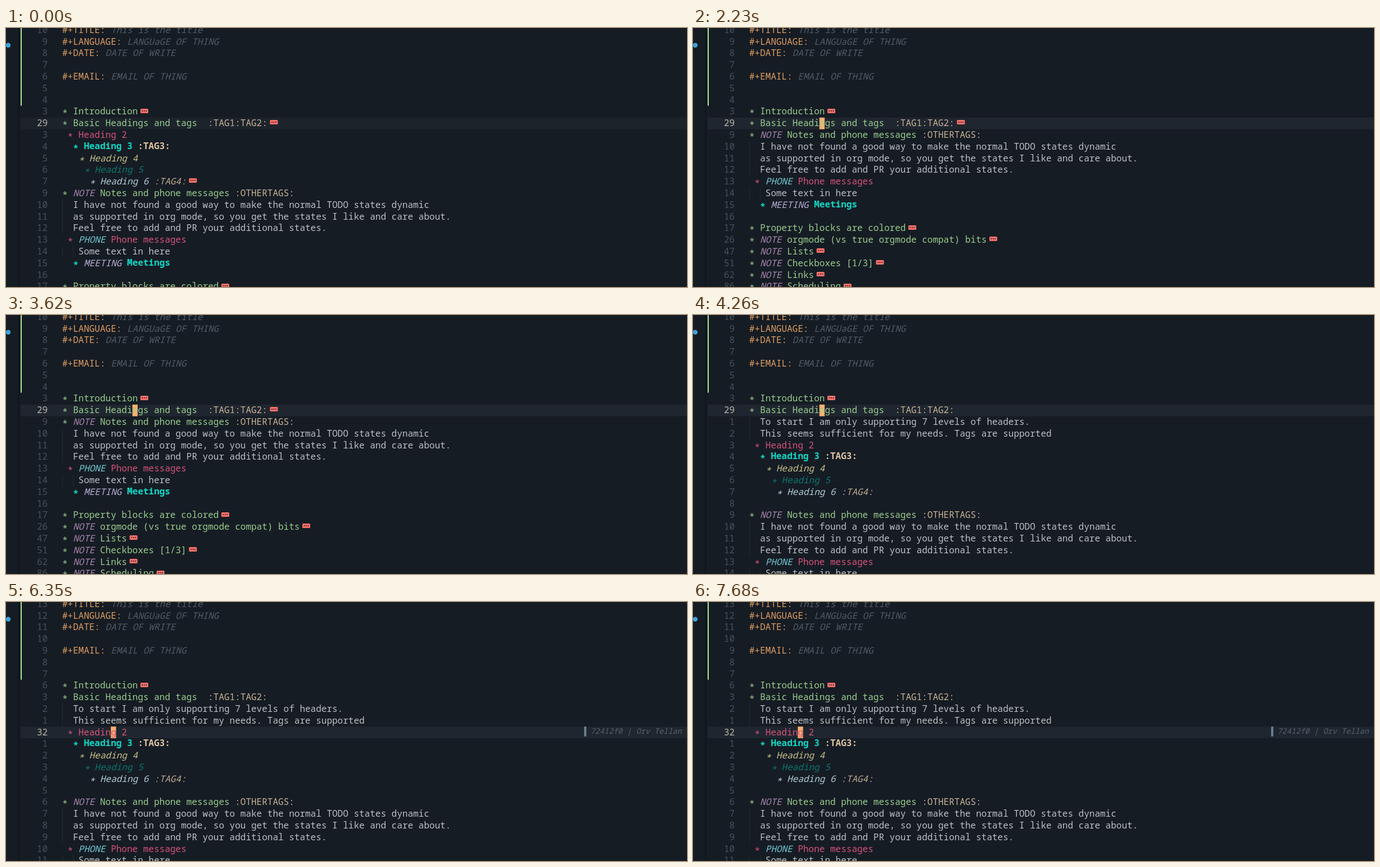
Animation of 1211 by 462 pixels, one loop 8 s. Source, as an HTML page with a canvas:

```html
<!DOCTYPE html>
<html lang="en">
<head>
<meta charset="utf-8">
<title>Org folding</title>
<style>
  html, body { margin: 0; width: 100%; height: 100%; overflow: hidden; background: #161c24; }
  canvas { display: block; }
</style>
</head>
<body>
<canvas id="stage" width="1211" height="462"></canvas>
<script>
const ctx = document.getElementById('stage').getContext('2d');
const WIDTH = 1211, HEIGHT = 462, LOOP = 8000;
const CELL = 9.6, ROW = 20.8, LEFT = 100, FIRST = 3.8;
const BASELINE = 5, BOLD_BASELINE = 4;
const FAMILY = '"Noto Sans Mono", "Liberation Mono", monospace';

// style: [colour, font variant]
const STYLES = {
  key: ['#dc9c61'], meta: ['#505b65', 'italic'], text: ['#bcc0c3'],
  h1: ['#98cd8e'], h2: ['#d6527a'], h3: ['#10dac8', 'bold'], h4: ['#c6c38a', 'italic'],
  h5: ['#0b766f', 'italic'], h6: ['#b2ced6', 'italic'],
  tag: ['#c6b196'], tagBold: ['#dfc5a4', 'bold'], tagItalic: ['#bda992', 'italic'],
  note: ['#a886ae', 'italic'], phone: ['#72cbd3', 'italic'], meeting: ['#b6add4', 'italic']
};

const option = (key, value) => [['key', key + ' '], ['meta', value]];
const note = title => [['h1', '* '], ['note', 'NOTE '], ['h1', title]];

// Visible text by absolute line number; each line is a list of [style, text]
const LINES = {
  19: option('#+TITLE:', 'This is the title'),
  20: option('#+LANGUAGE:', 'LANGUaGE OF THING'),
  21: option('#+DATE:', 'DATE OF WRITE'),
  22: [],
  23: option('#+EMAIL:', 'EMAIL OF THING'),
  24: [],
  25: [],
  26: [['h1', '* Introduction']],
  29: [['h1', '* Basic Headings and tags  '], ['tag', ':TAG1:TAG2:']],
  30: [['text', '  To start I am only supporting 7 levels of headers.']],
  31: [['text', '  This seems sufficient for my needs. Tags are supported']],
  32: [['h2', ' * Heading 2']],
  33: [['h3', '  * Heading 3 '], ['tagBold', ':TAG3:']],
  34: [['h4', '   * Heading 4']],
  35: [['h5', '    * Heading 5']],
  36: [['h6', '     * Heading 6 '], ['tagItalic', ':TAG4:']],
  37: [],
  38: [...note('Notes and phone messages '), ['tag', ':OTHERTAGS:']],
  39: [['text', '  I have not found a good way to make the normal TODO states dynamic']],
  40: [['text', '  as supported in org mode, so you get the states I like and care about.']],
  41: [['text', '  Feel free to add and PR your additional states.']],
  42: [['h2', ' * '], ['phone', 'PHONE '], ['h2', 'Phone messages']],
  43: [['text', '   Some text in here']],
  44: [['h3', '  * '], ['meeting', 'MEETING '], ['h3', 'Meetings']],
  45: [],
  46: [['h1', '* Property blocks are colored']],
  55: note('orgmode (vs true orgmode compat) bits'),
  76: note('Lists'),
  80: note('Checkboxes [1/3]'),
  91: note('Links'),
  115: note('Scheduling')
};
const ALWAYS_FOLDED = [26, 46, 55, 76, 80, 91, 115];

const span = (a, b) => Array.from({ length: b - a + 1 }, (_, i) => a + i);
const FOLDS = {
  outline: { hidden: [30, 31, 37], marks: [29, 36] },
  closed: { hidden: span(30, 37), marks: [29] },
  heading2: { hidden: span(33, 37), marks: [32] },
  heading3: { hidden: span(34, 37), marks: [33] },
  open: { hidden: [], marks: [] }
};

const FOLD_TIMES = [
  [0, 'outline'], [2230, 'closed'], [2640, 'heading2'], [2930, 'open'],
  [3620, 'closed'], [3940, 'heading2'], [4260, 'open'],
  [5650, 'heading2'], [6040, 'heading3'], [6350, 'open'],
  [7050, 'heading2'], [7360, 'heading3'], [7680, 'open']
];
// Pointer positions; a bare time hides the pointer
const POINTER = [
  [0], [70, 711, 341], [150, 638, 346], [380, 468, 273], [460, 318, 212],
  [610, 286, 195], [690, 252, 178], [760, 240, 171], [1000, 236, 171], [1080, 233, 171],
  [2230], [4800, 232, 172], [4880, 229, 177], [4960, 222, 188], [5040, 212, 203],
  [5120, 202, 217], [5200, 193, 229], [5280, 187, 236], [5360, 184, 238],
  [6040]
];
const FOCUS_AT = 1160, CLICK_AT = 5440, BLAME_AT = 6040;

const latest = (steps, t) => steps.filter(s => s[0] <= t).pop();

function setFont(variant, size = 16) {
  const weight = variant === 'bold' ? 700 : 300;
  ctx.font = `${variant === 'italic' ? 'italic ' : ''}${weight} ${size}px ${FAMILY}`;
}

function drawSegment(style, text, col, mid) {
  const [colour, variant] = STYLES[style];
  const x = LEFT + col * CELL;
  const base = Math.round(mid + (variant === 'bold' ? BOLD_BASELINE : BASELINE));
  ctx.fillStyle = colour;
  setFont(variant);
  const star = text.indexOf('*');
  if (star >= 0) ctx.fillText('*', x + star * CELL, base + 4);
  ctx.fillText(text.replace('*', ' '), x, base);
}

function drawMark(col, mid) {
  const x = LEFT + col * CELL + 4.6, y = Math.round(mid - 5.8);
  ctx.fillStyle = '#f8706a';
  ctx.beginPath();
  ctx.roundRect(x, y, 14, 8, 1.5);
  ctx.fill();
  ctx.fillStyle = '#2a2028';
  for (let i = 0; i < 3; i++) ctx.fillRect(x + 2.6 + i * 3.5, y + 3, 1.8, 1.8);
}

function drawGuides(segments, mid) {
  if (!segments.length || segments[0][0] !== 'text') return;
  const indent = segments[0][1].search(/\S/);
  ctx.fillStyle = '#232a32';
  for (let col = 0; col < indent; col += 2) {
    ctx.fillRect(Math.round(LEFT + col * CELL), mid - ROW / 2, 1, ROW);
  }
}

function drawCurrentRow(t, col, mid) {
  const focused = t >= FOCUS_AT;
  ctx.fillStyle = focused ? '#1f262f' : '#1c232b';
  ctx.fillRect(26, mid - ROW / 2, WIDTH, ROW);
  if (focused) {
    ctx.fillStyle = '#fbb070';
    ctx.fillRect(LEFT + col * CELL, mid - ROW / 2, 9.3, ROW);
  }
  if (t >= BLAME_AT) {
    ctx.fillStyle = '#687d8b';
    ctx.fillRect(1028, mid - 10.4, 4, 17.6);
    ctx.fillStyle = '#56636d';
    setFont('italic', 13.5);
    ctx.fillText('72412f0 | Orv Tellan', 1039.5, Math.round(mid + 2.6));
  }
}

function drawGutter() {
  ctx.fillStyle = '#12171e';
  ctx.fillRect(21, 0, 3, HEIGHT);
  ctx.fillStyle = '#aee89f';
  ctx.fillRect(26, 0, 2, 138.6);
  ctx.fillStyle = '#3ca4dc';
  ctx.beginPath();
  ctx.arc(4, 30.7, 4.2, 0, Math.PI * 2);
  ctx.fill();
}

function drawPointer(x, y) {
  ctx.beginPath();
  ctx.moveTo(x - 3.5, y - 9);
  ctx.quadraticCurveTo(x, y - 9, x, y - 6);
  ctx.lineTo(x, y + 6);
  ctx.quadraticCurveTo(x, y + 9, x - 3.5, y + 9);
  ctx.moveTo(x + 3.5, y - 9);
  ctx.quadraticCurveTo(x, y - 9, x, y - 6);
  ctx.moveTo(x, y + 6);
  ctx.quadraticCurveTo(x, y + 9, x + 3.5, y + 9);
  for (const [colour, width] of [['#f2f2f2', 3], ['#101010', 1.3]]) {
    ctx.strokeStyle = colour;
    ctx.lineWidth = width;
    ctx.stroke();
  }
}

function draw(t) {
  ctx.fillStyle = '#161c24';
  ctx.fillRect(0, 0, WIDTH, HEIGHT);
  const fold = FOLDS[latest(FOLD_TIMES, t)[1]];
  const marks = [...ALWAYS_FOLDED, ...fold.marks];
  const current = t < CLICK_AT ? 29 : 32;
  const caretCol = current === 29 ? 13 : 9;
  const visible = Object.keys(LINES).map(Number).filter(n => !fold.hidden.includes(n));

  visible.forEach((number, row) => {
    const mid = FIRST + row * ROW;
    const segments = LINES[number];
    if (number === current) drawCurrentRow(t, caretCol, mid);
    drawGuides(segments, mid);

    const label = String(number === current ? number : Math.abs(number - current));
    ctx.fillStyle = number === current ? '#b9b4aa' : '#475059';
    setFont();
    ctx.fillText(label, 74.2 - label.length * CELL, Math.round(mid + BASELINE));

    let col = 0;
    for (const [style, text] of segments) {
      drawSegment(style, text, col, mid);
      col += text.length;
    }
    if (marks.includes(number)) drawMark(col, mid);
  });

  drawGutter();
  const [, x, y] = latest(POINTER, t);
  if (x !== undefined) drawPointer(x, y);
}

const start = performance.now();
function tick() {
  draw((performance.now() - start) % LOOP);
  requestAnimationFrame(tick);
}
tick();
</script>
</body>
</html>
```
